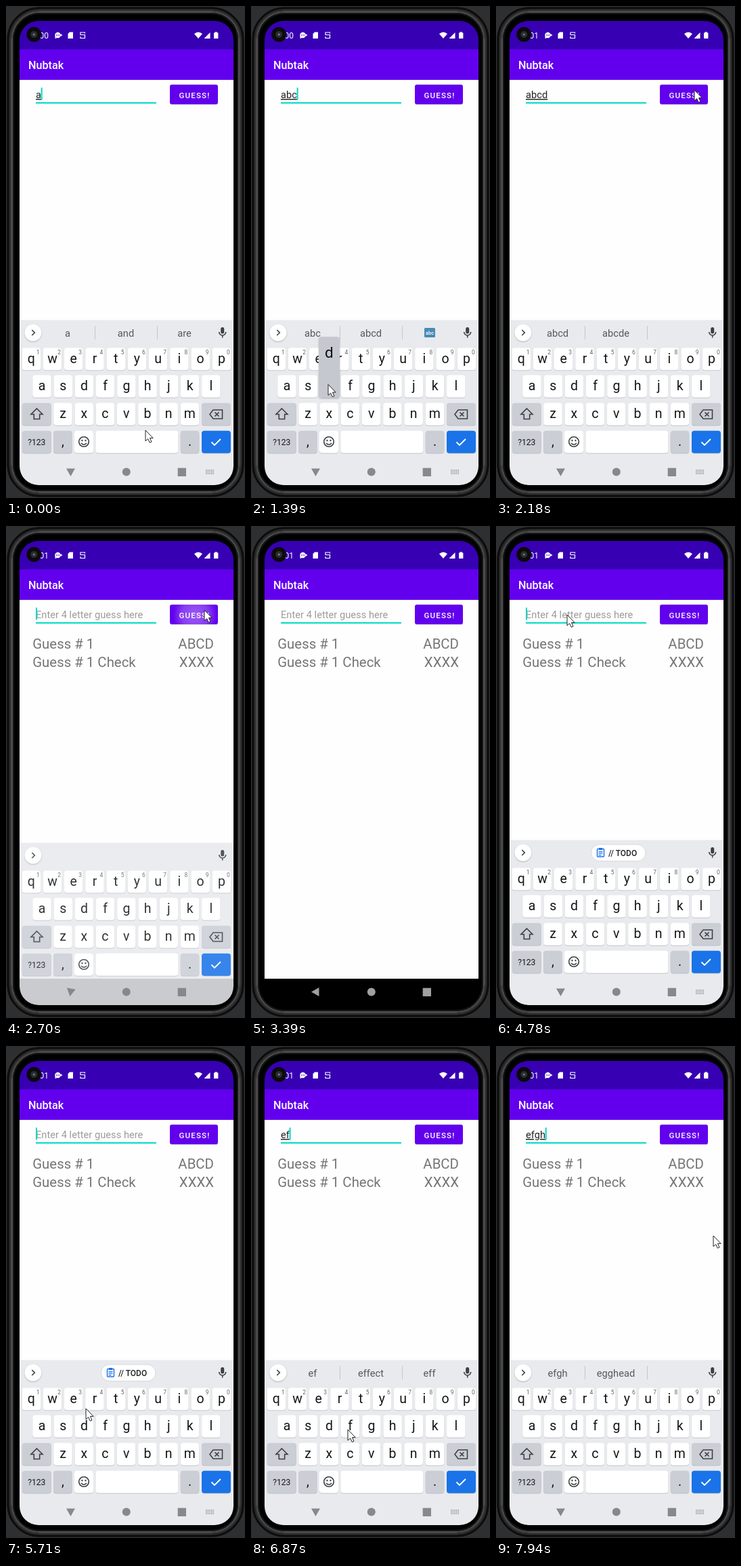
Recreate the animation shown at these times as an HTML page. Size 353x726 px, loop 8000 ms.

```html
<!DOCTYPE html>
<html lang="en">
<head>
<meta charset="utf-8">
<title>Word guess on a phone</title>
<style>
  html, body { margin: 0; width: 100%; height: 100%; overflow: hidden; background: #2e2f30; }
  svg { display: block; width: 353px; height: 726px; font-family: Roboto, sans-serif; }
  .mid { text-anchor: middle; }
  .end { text-anchor: end; }
  .bold { font-weight: 500; }
  .line { fill: none; stroke: #3c4043; stroke-width: 1.6; }
  #typed { text-decoration: underline; text-decoration-thickness: 1px; text-decoration-skip-ink: none; }
</style>
</head>
<body>
<svg viewBox="0 0 353 726">
  <defs>
    <clipPath id="screen"><rect x="20" y="22" width="316" height="685" rx="28"/></clipPath>
    <clipPath id="button"><rect x="242" y="116" width="71" height="29" rx="3"/></clipPath>
    <radialGradient id="glow">
      <stop offset="0" stop-color="#fff" stop-opacity=".36"/>
      <stop offset=".6" stop-color="#fff" stop-opacity=".24"/>
      <stop offset="1" stop-color="#fff" stop-opacity="0"/>
    </radialGradient>
    <filter id="shade" x="-20%" y="-20%" width="140%" height="140%">
      <feDropShadow dx="0" dy="1" stdDeviation="1" flood-opacity=".28"/>
    </filter>
  </defs>

  <!-- phone body -->
  <rect width="353" height="726" fill="#2e2f30"/>
  <g fill="none" stroke-width="2">
    <rect x="2.5" y="2.5" width="348" height="721" rx="47" fill="#000" stroke="#0c0c0c"/>
    <rect x="5" y="5" width="343" height="716" rx="44.500" stroke="#242424"/>
    <rect x="7" y="7" width="339" height="712" rx="42.500" stroke="#3a3a3a"/>
    <rect x="9" y="9" width="335" height="708" rx="40.500" stroke="#505050"/>
    <rect x="11" y="11" width="331" height="704" rx="38.500" stroke="#161616"/>
  </g>

  <g clip-path="url(#screen)">
    <rect x="20" y="22" width="316" height="685"/>
    <rect x="20" y="109" width="316" height="559" fill="#fefefe"/>
    <rect x="20" y="22" width="316" height="42" fill="#3700b3"/>
    <rect x="20" y="64" width="316" height="45" fill="#6200ee"/>

    <!-- status bar -->
    <g fill="#fff">
      <text id="clock" x="49.500" y="47.500" font-size="12"></text>
      <circle cx="76.500" cy="43" r="4.200"/><path d="M72.500 44v4l3.500-1.200zM80.500 41l3 2-3 2z"/>
      <path d="M94 38.500h5V48h-7.500v-7z"/>
      <path d="M116.500 40.500v-1.500H110v3.500h6.500v5H110V45" fill="none" stroke="#fff" stroke-width="1.200"/>
      <path d="M278 41q6-5 12 0l-6 7z"/>
      <path d="M292.500 48h9v-9z"/>
      <path d="M307 39.500h1.700v-1.200h3v1.200h1.700V48H307z"/>
    </g>
    <path d="M74.500 42.300h1.500v1.500h-1.500zM77.500 42.300H79v1.500h-1.500z" fill="#3700b3"/>
    <circle cx="41.300" cy="42" r="11" fill="#0b0b0d"/>
    <circle cx="41.300" cy="42" r="5" fill="#2a2c2e"/>
    <circle cx="41.300" cy="42" r="1.600" fill="#777c80"/>
    <text class="bold" x="33" y="93" font-size="16.200" fill="#fff">Nubtak</text>

    <!-- guess form -->
    <text id="hint" x="44" y="136" font-size="14.700" fill="#9b9b9b">Enter 4 letter guess here</text>
    <text id="typed" x="44" y="136" font-size="14.700" fill="#222"></text>
    <rect x="44" y="142" width="178" height="2" fill="#03dac5"/>
    <rect id="caret" y="120.500" width="2" height="18" fill="#03dac5"/>
    <rect x="242" y="117" width="71" height="29" rx="3" opacity=".14"/>
    <rect x="242" y="116" width="71" height="29" rx="3" fill="#6200ee"/>
    <g clip-path="url(#button)"><circle id="ripple" cx="279" cy="131" fill="url(#glow)"/></g>
    <text class="bold" x="255.500" y="135.500" font-size="11.600" letter-spacing="1.150" fill="#fff">GUESS!</text>
    <g id="rows" font-size="20.400" fill="#757575">
      <text x="39.200" y="181">Guess # 1</text><text class="end" x="307" y="181">ABCD</text>
      <text x="39.200" y="208">Guess # 1 Check</text><text class="end" x="307" y="208">XXXX</text>
    </g>

    <!-- keyboard -->
    <g id="board">
      <rect x="20" y="463.500" width="316" height="300" fill="#e8eaed"/>
      <circle cx="40" cy="482" r="12.300" fill="#fff" filter="url(#shade)"/>
      <path class="line" d="M38.300 478l4 4-4 4"/>
      <rect x="317.200" y="474" width="5" height="9.500" rx="2.500" fill="#3c4043"/>
      <path class="line" d="M314.700 481a5 5 0 0 0 10 0M319.700 486v3.500"/>
      <path id="bars" d="M131.500 472v20M223.500 472v20" stroke="#c3c6cb"/>
      <g class="mid" font-size="14.700" fill="#55595e">
        <text class="sug" x="91" y="487.500"></text>
        <text class="sug" x="177" y="487.500"></text>
        <text class="sug" x="263.500" y="487.500"></text>
      </g>
      <g id="emoji">
        <rect x="256" y="475" width="16" height="14" rx="1.500" fill="#4a8ab4"/>
        <text class="mid bold" x="264" y="484.500" font-size="7.500" fill="#fff">abc</text>
      </g>
      <g id="chip">
        <rect x="140.500" y="470" width="80.500" height="24.500" rx="12.200" fill="#fff" stroke="#d6d8dc"/>
        <rect x="149.500" y="476.500" width="10" height="11.500" rx="1" fill="none" stroke="#1a73e8" stroke-width="1.400"/>
        <path d="M152 475h5v3h-5zM151.500 480h6v1.200h-6zM151.500 482.500h6v1.200h-6zM151.500 485h4v1.200h-4z" fill="#1a73e8"/>
        <text class="bold" x="166" y="486.500" font-size="12" fill="#202124">// TODO</text>
      </g>
      <g id="keys"></g>
      <g class="line">
        <path d="M45.500 594l8.500 8.500h-4.300v7h-8.400v-7H37z"/>
        <path d="M301 602.500l5-6.500h13.500v13H306zM308.500 599.500l6 6m0-6l-6 6"/>
        <circle cx="115" cy="643" r="7.300"/><path d="M111 645q4 4.500 8 0"/>
      </g>
      <path d="M111.500 640h2v2.200h-2zM116.500 640h2v2.200h-2z" fill="#3c4043"/>
      <path d="M303.500 643.500l4.500 4.500 9-9" fill="none" stroke="#fff" stroke-width="1.800"/>
      <g id="popup">
        <rect x="-15.500" y="-73" width="31" height="90" rx="4" fill="#c6c8d0" filter="url(#shade)"/>
        <text class="mid" y="-42.500" font-size="22.500" fill="#111"></text>
      </g>
    </g>

    <!-- navigation bar -->
    <g id="nav">
      <path id="back" d="M-6.500 0L5-6.500v13z"/>
      <circle cx="177.800" cy="687.500" r="6"/>
      <rect x="253.700" y="681.700" width="12.300" height="12.300"/>
      <path id="switch" d="M295 685h12m-12 2.500h12m-12 2.500h12" stroke="#94989d" stroke-width="1.600" stroke-dasharray="1.600 1"/>
    </g>
  </g>
  <path id="mouse" d="M0 0V16L3.700 12.700 6.300 18.300 9 17.100 6.500 11.600H11.200Z" fill="#fff" stroke="#222"/>
</svg>
<script>
const $ = id => document.getElementById(id);
const LOOP = 8000;

const bursts = [
  [0, 0, 1], [120, 1120, 7], [1240, 1240, 1], [1390, 2180, 7], [2300, 2450, 2], [2700, 3240, 5],
  [3390, 3390, 1], [3670, 4075, 4], [4210, 4660, 4], [4780, 5710, 8], [5860, 6430, 5],
  [6730, 7660, 8], [7790, 7940, 2]
];
const ticks = bursts.flatMap(([a, b, n]) =>
  Array.from({ length: n }, (_, i) => a + (n > 1 ? (b - a) * i / (n - 1) : 0)));

// time, field text, suggestions
const typing = [
  [0, 'a', 'a', 'and', 'are'],
  [615, 'ab', 'ab', 'abc', 'about'],
  [1115, 'abc', 'abc', 'abcd', ''],
  [1510, 'abcd', 'abcd', 'abcde', ''],
  [2440, ''],
  [4360, ''],
  [6280, 'e', 'e', 'even', 'eat'],
  [6860, 'ef', 'ef', 'effect', 'eff'],
  [7125, 'efg', 'efg', 'egg', ''],
  [7520, 'efgh', 'efgh', 'egghead', '']
];
// time down, time up, key
const presses = [
  [450, 615, 'b'], [950, 1115, 'c'], [1385, 1510, 'd'], [6000, 6280, 'e'],
  [6730, 6860, 'f'], [6990, 7125, 'g'], [7390, 7520, 'h']
];
// time, x, y
const pointer = [
  [0, 206, 626], [290, 207, 604], [620, 207, 604], [790, 146, 602], [1120, 143, 601],
  [1240, 114, 559], [1521, 114, 558], [1780, 250, 300], [1930, 324, 170], [2180, 293, 124],
  [3390, 293, 124], [3800, 150, 230], [4075, 105, 131], [4780, 105, 131], [5180, 165, 671],
  [5580, 118, 535], [5860, 118, 535], [6000, 99, 524], [6290, 99, 524], [6430, 141, 569],
  [6863, 143, 566], [6990, 176, 567], [7130, 176, 567], [7390, 206, 568], [7660, 206, 568],
  [7940, 321, 280]
];
// time, keyboard drop, keyboard opacity, angle of the back arrow
const slide = [
  [2550, 0, 1, -90], [2700, 4, .87, -80], [2835, 22, .4, -35], [2970, 40, 0, 0],
  [3940, 60, 0, 0], [4075, 45, .6, 0], [4210, 17, 1, -15], [4360, 4, 1, -60], [4510, 0, 1, -90]
];

const keyAt = {};
const markup = [];

function addKey(x, y, w, label = '', fill = '#fff', size = 19.5, dy = 6) {
  const box = (top, colour) =>
    `<rect x="${x - w / 2}" y="${top}" width="${w}" height="33" rx="4" fill="${colour}"/>`;
  markup.push(box(y - 15.7, '#b4b7bd'), box(y - 16.5, fill),
    `<text class="mid" x="${x}" y="${y + dy}" font-size="${size}" fill="#161616">${label}</text>`);
}

function buildKeys() {
  const grey = '#cbced5';
  [['qwertyuiop', 37.3, 521], ['asdfghjkl', 53, 561.3], ['zxcvbnm', 84, 602.2]].forEach(([row, x0, y], r) => {
    [...row].forEach((c, i) => {
      const x = x0 + 31.23 * i;
      keyAt[c] = [x, y];
      addKey(x, y, 27.5, c);
      if (!r) markup.push(`<text class="mid" x="${x + 10}" y="513.500" font-size="8.500" fill="#5f6368">${(i + 1) % 10}</text>`);
    });
  });
  const y = 643.2;
  addKey(45.3, 602.2, 43, '', grey);
  addKey(310.5, 602.2, 43, '', grey);
  addKey(45.3, y, 43, '?123', grey, 12.2, 4.5);
  addKey(84, y, 28, ',', grey);
  addKey(115, y, 28);
  addKey(193.3, y, 122);
  addKey(271.5, y, 27.5, '.', grey);
  addKey(310.5, y, 43, '', '#1a73e8');
  $('keys').innerHTML = markup.join('');
}

const lastBefore = (list, t) => list.reduce((best, row) => row[0] <= t ? row : best, list[0]);

function mix(list, t) {
  const i = list.findIndex(row => row[0] > t);
  if (i < 0) return list[list.length - 1].slice(1);
  if (!i) return list[0].slice(1);
  const a = list[i - 1], b = list[i], k = (t - a[0]) / (b[0] - a[0]);
  return a.slice(1).map((v, j) => v + (b[j + 1] - v) * k);
}

const clamp = v => Math.min(1, Math.max(0, v));
const show = (id, on) => $(id).setAttribute('visibility', on ? 'visible' : 'hidden');
const set = (id, name, value) => $(id).setAttribute(name, value);
const suggestions = document.querySelectorAll('.sug');

function draw(t) {
  const [since, text, ...words] = lastBefore(typing, t);
  $('clock').textContent = t < 1900 ? '00' : '01';
  $('typed').textContent = text;
  show('hint', !text);
  show('rows', t >= 2440);
  const focused = t < 2960 || t >= 4360;
  show('caret', focused && (t - since) % 1000 < 500);
  set('caret', 'x', text ? 43.7 + $('typed').getComputedTextLength() : 44);

  suggestions.forEach((el, i) => el.textContent = words[i] || '');
  show('bars', words.length);
  show('emoji', text === 'abc');
  show('chip', !text && t > 3500);

  const press = presses.find(([a, b]) => t >= a && t < b);
  show('popup', press);
  if (press) {
    set('popup', 'transform', `translate(${keyAt[press[2]]})`);
    $('popup').lastElementChild.textContent = press[2];
  }

  const [drop, alpha, angle] = mix(slide, t);
  set('board', 'transform', `translate(0 ${drop})`);
  set('board', 'opacity', alpha);
  set('back', 'transform', `translate(95.5 687.5) rotate(${angle})`);
  set('nav', 'fill', alpha > .5 ? '#85888c' : '#a0a0a0');
  show('switch', t < 2600 || t >= 4200);

  const wave = (t - 2300) / 1090;
  show('ripple', wave >= 0 && wave < 1);
  set('ripple', 'r', 18 + 40 * clamp(wave));
  set('ripple', 'opacity', clamp(1.8 * (1 - wave)));

  set('mouse', 'transform', `translate(${mix(pointer, t)})`);
  show('mouse', t < 3385 || t >= 3800);
}

const start = performance.now();

function frame(now) {
  const t = Math.max(0, now - start) % LOOP;
  draw(ticks.reduce((best, tick) => tick <= t + .5 ? tick : best, 0));
  requestAnimationFrame(frame);
}

buildKeys();
frame(start);
</script>
</body>
</html>
```
